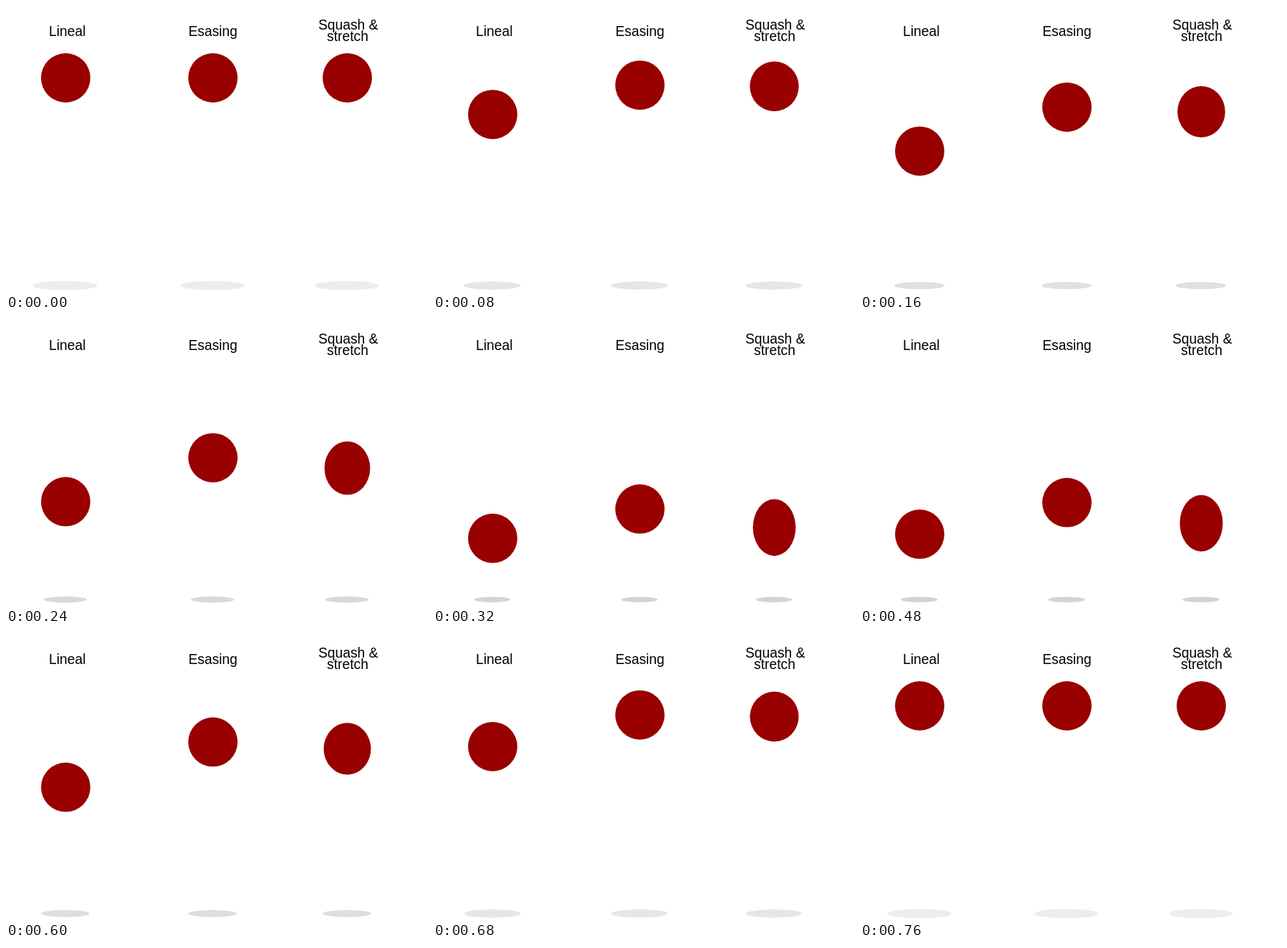
An HTML page with a canvas that plays this animation: 589x400 px, repeating every 800 ms.

```html
<!DOCTYPE html>
<html lang="en">
<head>
<meta charset="utf-8">
<title>Bouncing balls</title>
<style>
  html, body { margin: 0; overflow: hidden; background: #fff; }
  canvas { display: block; }
</style>
</head>
<body>
<canvas id="stage" width="589" height="400"></canvas>
<script>
const ctx = document.getElementById('stage').getContext('2d');
const STEP = 40, STEPS = 20, HIT = 10, LAST = 19;
const TOP = 100.5, FLOOR = 356.5, SIZE = 69;

const mix = (a, b, t) => a + (b - a) * t;

function ellipse(x, y, w, h, color) {
  ctx.fillStyle = color;
  ctx.beginPath();
  ctx.ellipse(x, y, w / 2, h / 2, 0, 0, Math.PI * 2);
  ctx.fill();
}

const ball = (x, y, w = SIZE, h = SIZE) => ellipse(x, y, w, h, '#900');

function shadow(x, fall) {
  const w = mix(90, 41, fall), grey = Math.round(mix(237, 204, fall));
  ellipse(x, 391, w, w * 13 / 90, `rgb(${grey},${grey},${grey})`);
}

// 0 at the top, 1 at the lowest key; gap = steps between that key and the hit
const fallAt = (step, gap = 0) => step <= HIT
  ? step / (HIT - gap)
  : (LAST - step) / (LAST - HIT - gap);

function squashBall(x, step) {
  if (step === HIT) return ball(x, 368.8, 99, 44);
  const t = fallAt(step, 1) ** 2;
  ball(x, mix(TOP, 340.5, t), mix(SIZE, 57.4, t), mix(SIZE, 82.3, t));
}

function labels() {
  ctx.fillStyle = '#000';
  ctx.font = '19.3px "Liberation Sans", Arial, sans-serif';
  ctx.textAlign = 'center';
  ctx.fillText('Lineal', 85.7, 41.5);
  ctx.fillText('Esasing', 289.5, 41.5);
  ctx.fillText('Squash &', 478.7, 33);
  ctx.fillText('stretch', 478, 48.5);
}

function draw() {
  const step = Math.floor(performance.now() / STEP) % STEPS;
  const fall = fallAt(step);
  ctx.fillStyle = '#fff';
  ctx.fillRect(0, 0, 589, 400);
  labels();
  for (const x of [83, 289, 477]) shadow(x, fall);
  ball(83.5, mix(TOP, FLOOR, fall));
  ball(289.5, mix(TOP, FLOOR, fall * fall));
  squashBall(477.5, step);
  requestAnimationFrame(draw);
}
draw();
</script>
</body>
</html>
```
